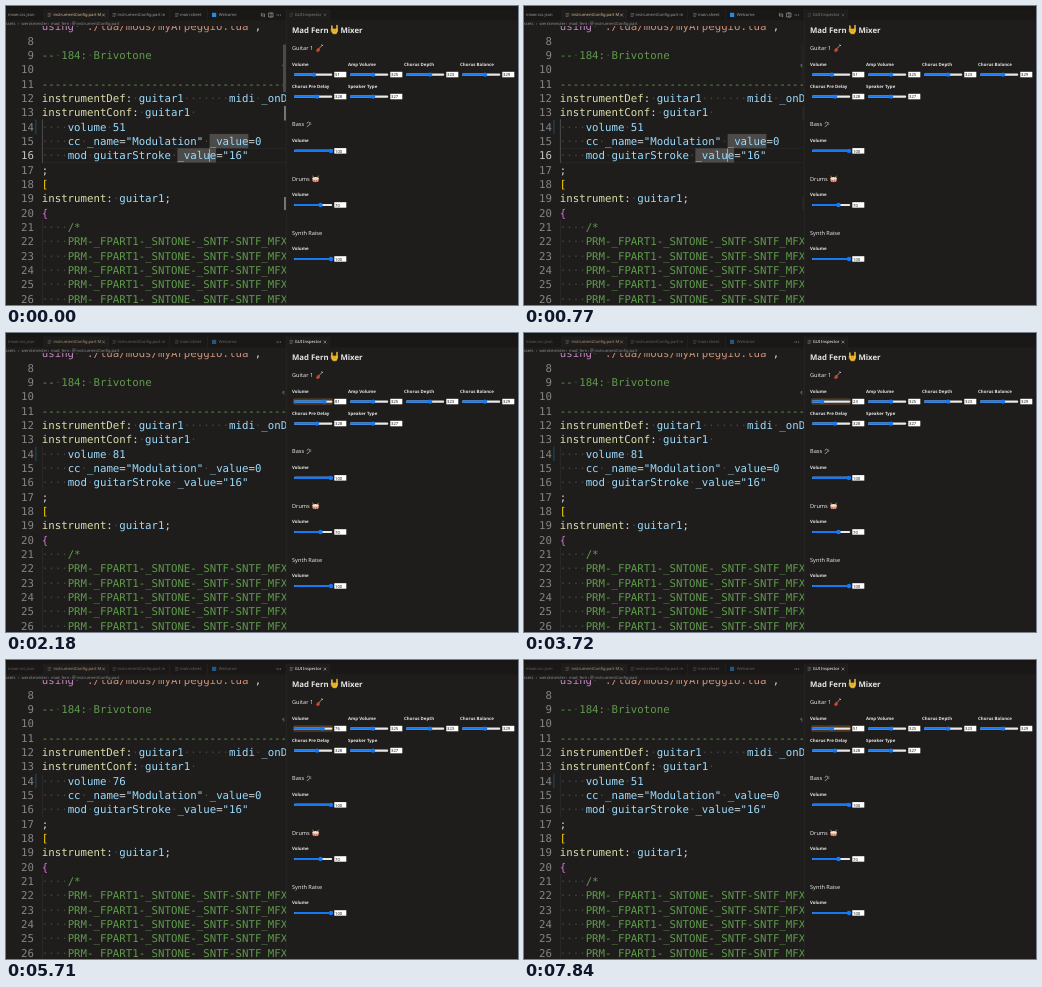
An HTML page that plays this animation: 512 by 299 pixels, repeating every 8040 ms.

```html
<!DOCTYPE html>
<html lang="en">
<head>
<meta charset="utf-8">
<title>Mixer inspector</title>
<style>
html, body { margin: 0; width: 100%; height: 100%; overflow: hidden; background: #1e1d1c; }
svg { display: block; width: 512px; height: 299px; }
text { white-space: pre; text-rendering: geometricPrecision; }
.code { font: 10.72px "DejaVu Sans Mono", "Noto Sans Mono", monospace; }
.ui { font-family: "Noto Sans", "Open Sans", sans-serif; }
</style>
</head>
<body>
<svg id="stage" viewBox="0 0 512 299" xmlns="http://www.w3.org/2000/svg">
  <defs>
    <clipPath id="pane"><rect x="0" y="20" width="280" height="279"/></clipPath>
  </defs>
</svg>
<script>
const LOOP = 8040, FOCUS_AT = 880;
const CHAR = 6.455, LINE = 14.33, LEFT = 35.8;
const stage = document.getElementById("stage");

function add(parent, tag, attrs, content) {
  const el = document.createElementNS("http://www.w3.org/2000/svg", tag);
  for (const key in attrs) el.setAttribute(key, attrs[key]);
  if (content !== undefined) el.textContent = content;
  parent.appendChild(el);
  return el;
}
const rect = (p, x, y, width, height, fill, more) =>
  add(p, "rect", { x, y, width, height, fill, ...more });
const path = (p, d, stroke, width, fill = "none") =>
  add(p, "path", { d, stroke, "stroke-width": width, fill, "stroke-linecap": "round" });
const label = (p, x, y, size, str, fill, weight = 400) =>
  add(p, "text", { x, y, class: "ui", "font-size": size, fill, "font-weight": weight }, str);
const group = (p = stage, attrs = {}) => add(p, "g", attrs);

/* ---------- editor ---------- */
const COLOR = {
  using: "#c586c0", key: "#dcdcaa", name: "#9cdcfe", mark: "#d4d4d4", note: "#5f9a4c",
  path: "#ce9178", square: "#ffd700", curly: "#da70d6", space: "#454545"
};
const PRM = "    PRM-_FPART1-_SNTONE-_SNTF-SNTF_MFX";
const LINES = [
  'using "./lua/mods/myArpeggio.lua";', "", "-- 184: Brivotone", "", "-".repeat(40),
  "instrumentDef: guitar1       midi _onDevice", "instrumentConf: guitar1 ",
  "    volume 51", '    cc _name="Modulation" _value=0', '    mod guitarStroke _value="16"',
  ";", "[", "instrument: guitar1;", "{", "    /*", PRM, PRM, PRM, PRM, PRM
];
const rowY = n => 20.4 + (n - 7) * LINE;

function tokenColor(tok) {
  if (tok === "using") return COLOR.using;
  if (/^instrument/.test(tok)) return COLOR.key;
  if (/^"\./.test(tok)) return COLOR.path;
  if (tok === "[") return COLOR.square;
  if (tok === "{") return COLOR.curly;
  return /^[:;=]$/.test(tok) ? COLOR.mark : COLOR.name;
}

function codeText(parent, n, str) {
  const row = add(parent, "text", { x: LEFT, y: rowY(n) + 3.9, class: "code" });
  const note = /^\s*(--|\/\*|PRM)/.test(str);
  for (const tok of str.match(/\s+|"[^"]*"|\w+|[^\s\w"]+/g) || []) {
    const blank = tok[0] === " ";
    const fill = blank ? COLOR.space : note ? COLOR.note : tokenColor(tok);
    add(row, "tspan", { fill }, blank ? "·".repeat(tok.length) : tok);
  }
  return row;
}

rect(stage, 0, 0, 512, 299, "#1e1d1c");
const editor = group(stage, { "clip-path": "url(#pane)" });
path(editor, `M36.4 ${rowY(14) - 7}V${rowY(17) - 7}M36.4 ${rowY(21) - 7}V299`, "#333231", 0.6);
const selection = group(editor);
path(selection, "M36 142.4H280M36 156.7H280", "#2b2a29", 0.7);
path(selection, `M36.4 ${rowY(14) - 7}V${rowY(17) - 7}`, "#5a5958", 0.7);
[[15, 26], [16, 21]].forEach(([n, col]) =>
  rect(selection, LEFT + col * CHAR, rowY(n) - 7.1, 6 * CHAR, LINE, "#4c4b4a"));

rect(editor, 29.4, rowY(14) - 7.1, 1, LINE, "#17506e");
let volumeText, currentNumber;
LINES.forEach((str, i) => {
  const n = i + 7;
  if (n > 7) {
    const number = add(editor, "text", {
      x: 28, y: rowY(n) + 3.9, class: "code", "text-anchor": "end", fill: "#858585"
    }, n);
    if (n === 16) currentNumber = number;
  }
  const row = codeText(editor, n, str);
  if (n === 14) volumeText = row.lastChild;
});
const caret = rect(editor, LEFT + 26 * CHAR - 0.5, rowY(16) - 6.6, 0.9, 13, "#aeafad");
path(editor, "M276.2 59.6L277.8 58.2V61.2", "#8a8f94", 0.6);

const scrollbar = group(editor);
rect(scrollbar, 277, 38.5, 3, 47.5, "#4c4b4a");
rect(scrollbar, 278, 100, 2, 14.5, "#7a7978");
rect(scrollbar, 278, 191, 2, 13, "#7a7978");

/* ---------- tabs ---------- */
rect(stage, 0, 0, 512, 3.6, "#171615");
rect(stage, 0, 3.4, 512, 10.8, "#191817");
rect(stage, 38, 3.4, 64.5, 10.8, "#1e1d1c");
rect(stage, 280.5, 3.4, 43, 10.8, "#1e1d1c");
path(stage, "M38 3.4V14.2M102.5 3.4V14.2M163.5 3.4V14.2M201.5 3.4V14.2M323.5 3.4V14.2", "#2a2928", 0.5);
path(stage, "M280.3 3.4V299", "#2c2b2a", 0.6);

const lines = (p, x, y) => path(p, `M${x} ${y - 1.4}h2.8M${x} ${y}h2.8M${x} ${y + 1.4}h2`, "#8d8d8d", 0.5);
const cross = (p, x, y) => path(p, `M${x - 1.1} ${y - 1.1}l2.2 2.2m0 -2.2l-2.2 2.2`, "#c8c8c8", 0.5);
const TAB_Y = 10.4, TAB_SIZE = 4.1;

const mainTab = group();
lines(mainTab, 42, 9);
label(mainTab, 47.5, TAB_Y, TAB_SIZE, "instrumentConfig.part", "#e2c08d");
label(mainTab, 91.5, TAB_Y, TAB_SIZE, "M", "#e2c08d");
cross(mainTab, 97.5, 9);

const otherTabs = group();
label(otherTabs, 2, TAB_Y, TAB_SIZE, "mixer.css.json", "#9d9d9d");
[[107, "instrumentConfig.part in"], [169.5, "main.sheet"]].forEach(([x, str]) => {
  lines(otherTabs, x, 9);
  label(otherTabs, x + 4.5, TAB_Y, TAB_SIZE, str, "#9d9d9d");
});
rect(otherTabs, 206, 6.8, 4.2, 4.2, "#2a8bd6");
label(otherTabs, 212.8, TAB_Y, TAB_SIZE, "Welcome", "#9d9d9d");

const actions = group();
path(actions, "M255.4 7.2v2.8h2M258.6 10.8v-2.8h-2M263 7h4v4h-4zM265 7v4", "#c0c0c0", 0.55);
path(stage, "M271 9h.01M272.7 9h.01M274.4 9h.01", "#c0c0c0", 0.8);

const sideTab = group();
lines(sideTab, 284, 9);
label(sideTab, 288.7, TAB_Y, TAB_SIZE, "GUI Inspector", "#ffffff");
cross(sideTab, 319, 9);

[[-2.5, "assets"], [12, "›"], [15.5, "werckmeister"], [42, "›"], [45, "mad_fern"], [64, "›"], [70.5, "instrumentConfig.part"]]
  .forEach(([x, str]) => label(stage, x, 18.8, TAB_SIZE, str, "#8f8f8f"));
lines(stage, 66.5, 17.4);

/* ---------- mixer ---------- */
const INK = "#e4e4e4";
const heading = (y, str) => label(stage, 286, y, 5.6, str, INK, 500);

function slider(x, y, name, value, part) {
  label(stage, x, y - 8.9, 4.4, name, INK, 600);
  const ring = rect(stage, x + 1.8, y - 2.5, 38.4, 4.9, "none",
    { stroke: "#95602c", "stroke-width": 0.7, rx: 0.6, opacity: 0 });
  rect(stage, x + 2, y - 1.1, 38.2, 2.2, "#e8e8e8", { rx: 1 });
  const fill = rect(stage, x + 2, y - 1.1, 0, 2.2, "#1479f2", { rx: 1 });
  const knob = add(stage, "circle", { cy: y, r: 2.2, fill: "#1479f2" });
  rect(stage, x + 42.3, y - 2.8, 12, 5.5, "#ffffff");
  const out = label(stage, x + 43, y + 1.6, 4.2, "", "#222222");
  function set(v, share = v / 100) {
    const at = 4 + 35 * share;
    fill.setAttribute("width", at - 2);
    knob.setAttribute("cx", x + at);
    out.textContent = Math.round(v);
  }
  set(value, part);
  return { set, ring };
}

label(stage, 286, 26.7, 7.8, "Mad Fern", INK, 600);
label(stage, 334.4, 26.7, 7.8, "Mixer", INK, 600);
const hand = group(stage, { transform: "translate(.6 -.2)" });
path(hand, "M325.3 23.5V20.3M330.4 23.5V19.8", "#f2bd35", 1.5);
path(hand, "M324.8 23.2h6.2v2.2l-1.3 2.6h-3.3l-1.6-2.2z", "#f2bd35", 0.5, "#f2bd35");
path(hand, "M327.1 22.7v1.4M328.8 22.7v1.4M326.5 25.4h2.4", "#b87b1c", 0.5);

heading(44, "Guitar 1");
path(stage, "M312.4 43.2L316.2 39.2", "#c79364", 0.9);
path(stage, "M310.6 44.6l1.1-2.1 1.2.3.8 1.4-1.5 1.4z", "#c54a32", 0.9, "#c54a32");
path(stage, "M315.8 38.8l.9.8", "#dedede", 0.8);
const volume = slider(286, 68.6, "Volume", 51);
slider(342, 68.6, "Amp Volume", 325, 0.6);
slider(398, 68.6, "Chorus Depth", 323, 0.63);
slider(454, 68.6, "Chorus Balance", 329, 0.6);
slider(286, 90.6, "Chorus Pre Delay", 328, 0.6);
slider(342, 90.6, "Speaker Type", 327, 0.6);

heading(120.2, "Bass");
path(stage, "M301 117.3c.2-1.7 2.9-1.7 2.8.3-.1 1.5-1.3 2.4-2.6 2.9M304.8 116.9h.01M304.8 118.4h.01", INK, 0.6);
slider(286, 144.9, "Volume", 100);

heading(175, "Drums");
path(stage, "M306.6 172.6v2.4c1.2 1 4.8 1 6 0v-2.4", "#c9705c", 0.6, "#c9705c");
add(stage, "ellipse", { cx: 309.6, cy: 172.4, rx: 3.2, ry: 1.3, fill: "#efe6dc" });
path(stage, "M306.4 170l2.4 1.8M312.8 170l-2.4 1.8", "#c99c62", 0.6);
path(stage, "M307.8 173.8v1.6M309.6 174v1.6M311.4 173.8v1.6", "#f1d9b8", 0.6);
slider(286, 199, "Volume", 70);

heading(229, "Synth Raise");
slider(286, 253, "Volume", 100);

/* ---------- motion ---------- */
const DRAG = [[1270, 51], [1720, 81], [2740, 81], [3530, 24], [3720, 23], [4140, 23],
  [4800, 46], [5350, 76], [5940, 76], [6600, 51]];
const SAVED = [[0, 51], [2180, 81], [4140, 23], [5710, 76], [6970, 51]];

function dragAt(t) {
  const i = DRAG.findIndex(k => k[0] > t);
  if (i === 0) return DRAG[0][1];
  if (i < 0) return DRAG[DRAG.length - 1][1];
  const [t0, v0] = DRAG[i - 1], [t1, v1] = DRAG[i];
  return v0 + (v1 - v0) * (t - t0) / (t1 - t0);
}

const show = (el, opacity) => el.setAttribute("opacity", opacity);

function draw(t) {
  const side = t >= FOCUS_AT;
  // the idle scrollbar fades out over 800 ms
  show(scrollbar, Math.min(1, Math.max(0, (840 - t) / 800)));
  show(selection, side ? 0 : 1);
  show(caret, side ? 0 : 1);
  show(actions, side ? 0 : 1);
  show(mainTab, side ? 0.75 : 1);
  show(otherTabs, side ? 0.55 : 1);
  show(sideTab, side ? 1 : 0.45);
  show(volume.ring, side ? 1 : 0);
  currentNumber.setAttribute("fill", side ? "#858585" : "#c6c6c6");
  volume.set(Math.round(dragAt(t)));
  volumeText.textContent = SAVED.filter(k => k[0] <= t).pop()[1];
}

const start = performance.now();
function tick() {
  draw((performance.now() - start) % LOOP);
  requestAnimationFrame(tick);
}
draw(0);
requestAnimationFrame(tick);
</script>
</body>
</html>
```
